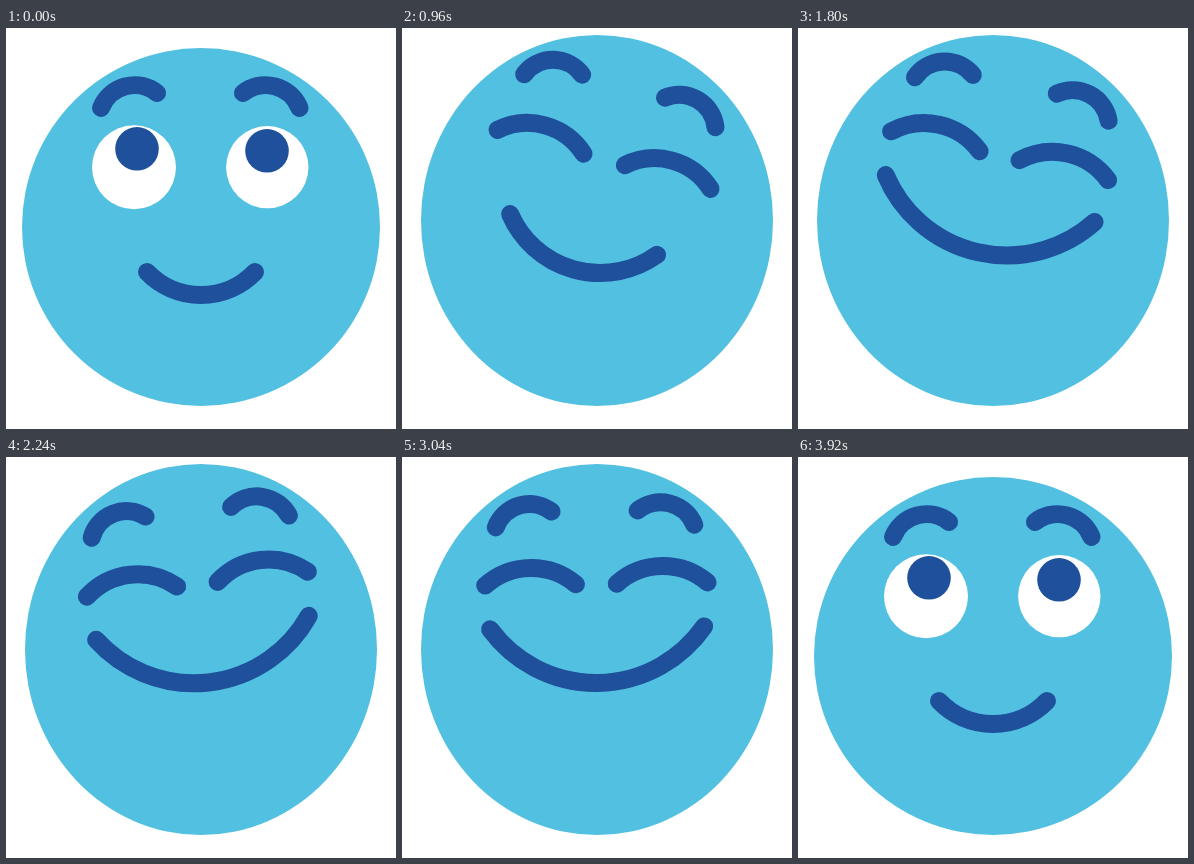
Recreate the animation shown at these times as an HTML page. Size 390 by 401 pixels, loop 4.2 s.

```html
<!DOCTYPE html>
<html lang="en">
<head>
<meta charset="utf-8">
<title>Laughing face</title>
<style>
  html, body { margin: 0; width: 100%; height: 100%; overflow: hidden; background: #fff; }
  svg { display: block; width: 100vw; height: 100vh; }
  .line { fill: none; stroke: #1e509b; stroke-width: 18; stroke-linecap: round; }
  .pupil { fill: #1e509b; }
</style>
</head>
<body>
<svg viewBox="0 0 390 401">
  <defs>
    <clipPath id="clipL"><path id="holeL"/></clipPath>
    <clipPath id="clipR"><path id="holeR"/></clipPath>
  </defs>
  <ellipse id="face" cx="195" fill="#52c0e0"/>
  <g id="head">
    <path id="whiteL" fill="#fff"/>
    <path id="whiteR" fill="#fff"/>
    <g clip-path="url(#clipL)"><circle id="pupilL" class="pupil" r="21.8"/></g>
    <g clip-path="url(#clipR)"><circle id="pupilR" class="pupil" r="21.8"/></g>
    <path id="lidL" class="line"/>
    <path id="lidR" class="line"/>
    <path id="browL" class="line"/>
    <path id="browR" class="line"/>
    <path id="smile" class="line"/>
  </g>
</svg>
<script>
const LOOP = 4200, STEP = 40;
const SWAY_START = 1030, SWAY_PERIOD = 740, SWAY_FADE = 2500;

const el = id => document.getElementById(id);
const set = (id, attrs) => {
  for (const k in attrs) el(id).setAttribute(k, attrs[k]);
};
const show = on => on ? 'visible' : 'hidden';
const clamp = v => Math.min(1, Math.max(0, v));
const mix = (a, b, p) => a + (b - a) * p;

// Eased 0 to 1 between two times
const ramp = (t, a, b) => (1 - Math.cos(Math.PI * clamp((t - a) / (b - a)))) / 2;
// Smooth 0 to 1 to 0 between two times
const bump = (t, a, b) => Math.sin(Math.PI * clamp((t - a) / (b - a))) ** 2;

// Laughing sway: eases in, then swings and fades
function sway(t) {
  const s = Math.max(0, t - SWAY_START);
  return 18.9 * ramp(t, 453, 1157) * clamp(1 - s / SWAY_FADE)
    * Math.cos(2 * Math.PI * s / SWAY_PERIOD);
}

// Circular arc to (x2, y2); positive bulge lies left of the travel direction
function arcTo(x1, y1, x2, y2, bulge) {
  const h = Math.hypot(x2 - x1, y2 - y1) / 2;
  const s = Math.max(Math.abs(bulge), 0.05);
  const r = (h * h + s * s) / (2 * s);
  return `A${r} ${r} 0 0 ${bulge > 0 ? 1 : 0} ${x2} ${y2}`;
}
const arc = (x1, y1, x2, y2, bulge) => `M${x1} ${y1}` + arcTo(x1, y1, x2, y2, bulge);

// A round eye that squeezes into a single upward arc
function drawEye(side, x, r, px, py, shut, dip) {
  const y = mix(139.2, 127, shut) + dip;
  const half = mix(r, 45.4, shut);
  const x1 = x - half, x2 = x + half;
  const top = mix(r, 17, shut);
  const low = mix(-r, 17, clamp(shut * 1.3));
  const width = 18 * clamp((shut - 0.3) / 0.4);
  const hole = arc(x1, y, x2, y, top) + arcTo(x2, y, x1, y, -low) + 'Z';
  set('white' + side, { d: hole, visibility: show(shut < 1) });
  set('hole' + side, { d: hole });
  set('pupil' + side, { cx: px, cy: py + dip, visibility: show(shut < 0.75) });
  set('lid' + side, {
    d: arc(x1, y, x2, y, low),
    style: `stroke-width:${width}`,
    visibility: show(width > 0)
  });
}

function draw(t) {
  const dip = 16.5 * bump(t, 400, 1000);
  const squash = bump(t, 500, 930);
  const lift = ramp(t, 660, 940) - ramp(t, 3220, 3720);
  const shut = ramp(t, 700, 1080) - ramp(t, 3420, 3920);
  const grin = ramp(t, 700, 1280) - ramp(t, 3260, 3920);

  const ry = 179 + 6.5 * lift - 10.5 * squash;
  set('face', { rx: 179 - 3 * lift + 6 * squash, ry, cy: 378 - ry });
  set('head', { transform: `rotate(${sway(t)} 195 158)` });

  drawEye('L', mix(128, 129, shut), 42, 131, 120.8, shut, dip);
  drawEye('R', mix(261.3, 260.6, shut), 41.2, 261, 122.8, shut, dip);

  const b = dip - 11 * lift;
  set('browL', { d: arc(95, 80 + b, 151, 65 + b, 14.6) });
  set('browR', { d: arc(237, 65 + b, 293.5, 80 + b, 14.6) });

  const half = mix(54, 107, grin);
  const y = mix(244, 170.9, grin ** 0.8) + dip;
  set('smile', { d: arc(195 - half, y, 195 + half, y, -mix(23, 55, grin)) });
}

const start = performance.now();
function tick() {
  const t = (performance.now() - start) % LOOP;
  draw(Math.floor(t / STEP) * STEP);
  requestAnimationFrame(tick);
}
draw(0);
requestAnimationFrame(tick);
</script>
</body>
</html>
```
